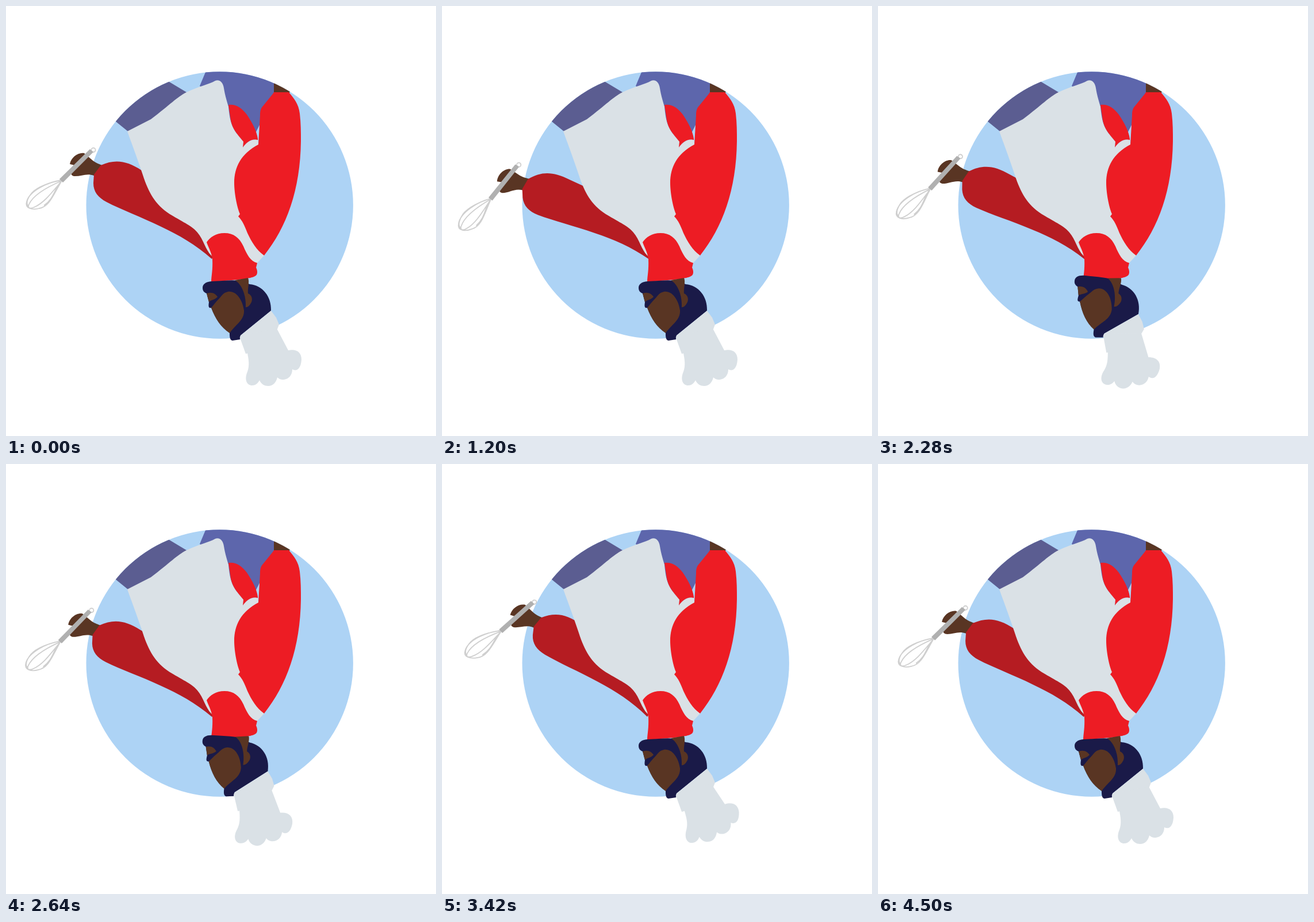
An HTML page with a canvas that plays this animation: 748x748 px, repeating every 4.53 s.

```html
<!DOCTYPE html>
<html lang="en">
<head>
<meta charset="utf-8">
<title>Chef</title>
<style>
  html, body { margin: 0; width: 100%; height: 100%; overflow: hidden; background: #fff; }
  canvas { display: block; width: 748px; height: 748px; }
</style>
</head>
<body>
<canvas id="stage" width="748" height="748"></canvas>
<script>
const ctx = document.getElementById('stage').getContext('2d');
const LOOP = 4530;

const color = {
  sky: '#add3f5', cloth: '#dae1e6', red: '#ed1c24', darkRed: '#b51c22',
  leg: '#5d66ac', farLeg: '#5b5d91', skin: '#593523', navy: '#1a1a48',
  handle: '#b0b0b0', wire: '#cfcfcf'
};

// Angle in degrees over time in ms
const armKeys = [[0, 0], [330, -.25], [630, -1.2], [780, -2.15], [1170, -6.6], [1440, -6.9],
  [1740, -6.5], [2265, -3.1], [2790, -.5], [3000, 0], [3330, 2.05], [3885, 6.9], [LOOP, 0]];
const headKeys = [[0, 0], [1230, 0], [1740, 4.5], [2280, 9.4], [2790, 4.7], [3000, .5],
  [3100, 0], [LOOP, 0]];
const hatKeys = [[0, 0], [1230, 0], [1740, 1.2], [2280, 1.8], [2790, -.8], [3000, -2.7],
  [3330, -5.5], [3885, -7.2], [LOOP, 0]];

const shapes = {};
const define = (name, d) => { shapes[name] = new Path2D(d); };

define('farLeg', 'M191 201V120L284 132L314 150L330 180L252 230L212 218Z');
define('leg', 'M350 108L337 139L360 165L400 222L435 219L441 207L455 190L470 160V108Z');
define('wrist', 'M466 120L500 140L492 152H466Z');
define('apron', `M211 218L252 197C285 172 298 158 314 150C335 140 354 136 364 130
  C372 127 378 134 379 143C381 156 385 168 387 175C390 205 393 213 413 236L412 246
  C420 235 430 231 438 233L439 241L440 300L449 434L437 447L380 452L357 434
  C347 424 344 407 333 394C324 383 315 380 290 365C262 349 250 328 240 300
  C232 275 220 243 211 218Z`);
define('fold', `M387 172C400 170 410 177 419 189C429 204 436 217 438 231L438 233
  C428 230 418 237 412 246L413 236C400 220 392 212 390 192Z`);
define('sleeve', `M466 150H492C501 161 509 170 511 187C513 204 513 220 513 235
  C512 320 488 385 449 434C436 425 427 410 420 395C415 382 411 373 404 366L407 362
  C400 345 397 320 397 308C397 280 409 257 439 241L442 190C442 183 443 178 447 174
  L464 153Z`);
define('chest', `M349 411C355 402 365 395 380 395C396 395 406 403 413 418
  C419 432 425 444 437 447L435 455C438 461 438 468 433 470C428 473 422 473 415 475
  L357 480C357 470 360 460 359 440C357 427 352 420 349 411Z`);

define('arm', `M165 277C190 266 210 269 236 286L259 300L335 350L366 425L358 440
  C330 415 300 398 270 384C235 367 200 354 175 341C160 333 152 323 152 308L153 293Z`);
define('hand', `M167 277L153 295C140 290 130 297 118 296C112 294 112 291 119 284L119 277
  L111 275C113 263 126 254 136 256L150 268C156 273 160 274 167 277Z`);
define('handle', 'M146 249L152 254L99 307L93 301Z');
define('wires', `M97 303C72 306 41 322 36 340C32 353 47 355 58 352C76 349 83 327 97 304
  M97 304C76 313 48 327 40 345C36 352 43 353 49 350C66 343 80 324 97 304
  M97 303C78 306 55 314 45 325C36 336 34 345 40 349
  M97 304C84 316 85 334 66 347`);

define('hair', `M342 490C342 484 347 480 357 479C380 478 400 475 414 480L424 484
  C446 486 462 505 461 530L408 573L407 580L394 582C389 581 389 575 389 568
  C375 560 365 545 357 525C352 526 352 522 353 515L349 500C344 498 342 495 342 490Z`);
define('face', `M357 525L366 514C376 504 377 499 386 497C400 495 411 510 414 529
  C415 547 400 553 389 569C374 559 364 544 357 525Z`);
define('brow', 'M349 500C358 497 364 500 368 506C362 512 356 511 353 515Z');
define('ear', `M398 477L421 473C424 480 420 492 421 500C428 503 429 510 427 515
  C424 521 421 524 417 524C418 505 411 484 398 477Z`);
define('band', 'M461 530L408 573C406 577 407 580 408 580L417 605L421 604L472 562L475 554L470 542Z');
define('puff', `M425 570L420 604C422 615 424 625 420 636C414 650 419 660 428 660
  C435 660 439 655 441 651C444 658 450 661 456 661C464 661 470 655 472 646
  C476 650 480 650 483 650C492 649 498 642 498 632C505 636 513 632 514 615
  C514 603 506 596 491 599L471 561Z`);

const fill = (name, tone) => {
  ctx.fillStyle = tone;
  ctx.fill(shapes[name]);
};

// Smooth curve through the keys that never overshoots them
function sample(keys, t) {
  const slope = i => (keys[i + 1][1] - keys[i][1]) / (keys[i + 1][0] - keys[i][0]);
  const tangent = i => {
    if (i === 0 || i === keys.length - 1) return 0;
    const a = slope(i - 1), b = slope(i);
    return a * b > 0 ? 2 * a * b / (a + b) : 0;
  };
  let i = 0;
  while (i < keys.length - 2 && t >= keys[i + 1][0]) i++;
  const [t0, v0] = keys[i], [t1, v1] = keys[i + 1];
  const d = t1 - t0, u = (t - t0) / d, w = 1 - u;
  return v0 * w * w * (1 + 2 * u) + v1 * u * u * (3 - 2 * u)
    + d * u * w * (tangent(i) * w - tangent(i + 1) * u);
}

function turned(x, y, degrees, paint) {
  ctx.save();
  ctx.translate(x, y);
  ctx.rotate(degrees * Math.PI / 180);
  ctx.translate(-x, -y);
  paint();
  ctx.restore();
}

function drawBackdrop() {
  ctx.save();
  ctx.beginPath();
  ctx.arc(371.7, 346.5, 232.2, 0, 2 * Math.PI);
  ctx.fillStyle = color.sky;
  ctx.fill();
  ctx.clip();
  fill('farLeg', color.farLeg);
  fill('leg', color.leg);
  fill('wrist', color.skin);
  ctx.restore();
}

function drawArm() {
  fill('hand', color.skin);
  fill('arm', color.darkRed);
  ctx.strokeStyle = color.wire;
  ctx.lineWidth = 1.8;
  ctx.stroke(shapes.wires);
  ctx.beginPath();
  ctx.arc(152, 250.5, 3.6, 0, 2 * Math.PI);
  ctx.stroke();
  fill('handle', color.handle);
}

function drawHead(hatAngle) {
  fill('hair', color.navy);
  fill('face', color.skin);
  fill('brow', color.skin);
  fill('ear', color.skin);
  fill('band', color.cloth);
  turned(422, 585, hatAngle, () => fill('puff', color.cloth));
}

function draw(t) {
  ctx.fillStyle = '#fff';
  ctx.fillRect(0, 0, 748, 748);
  drawBackdrop();
  turned(364, 421, sample(armKeys, t), drawArm);
  fill('apron', color.cloth);
  fill('fold', color.red);
  fill('sleeve', color.red);
  fill('chest', color.red);
  turned(420, 484, sample(headKeys, t), () => drawHead(sample(hatKeys, t)));
}

const start = performance.now();
function tick() {
  draw((performance.now() - start) % LOOP);
  requestAnimationFrame(tick);
}
tick();
</script>
</body>
</html>
```
